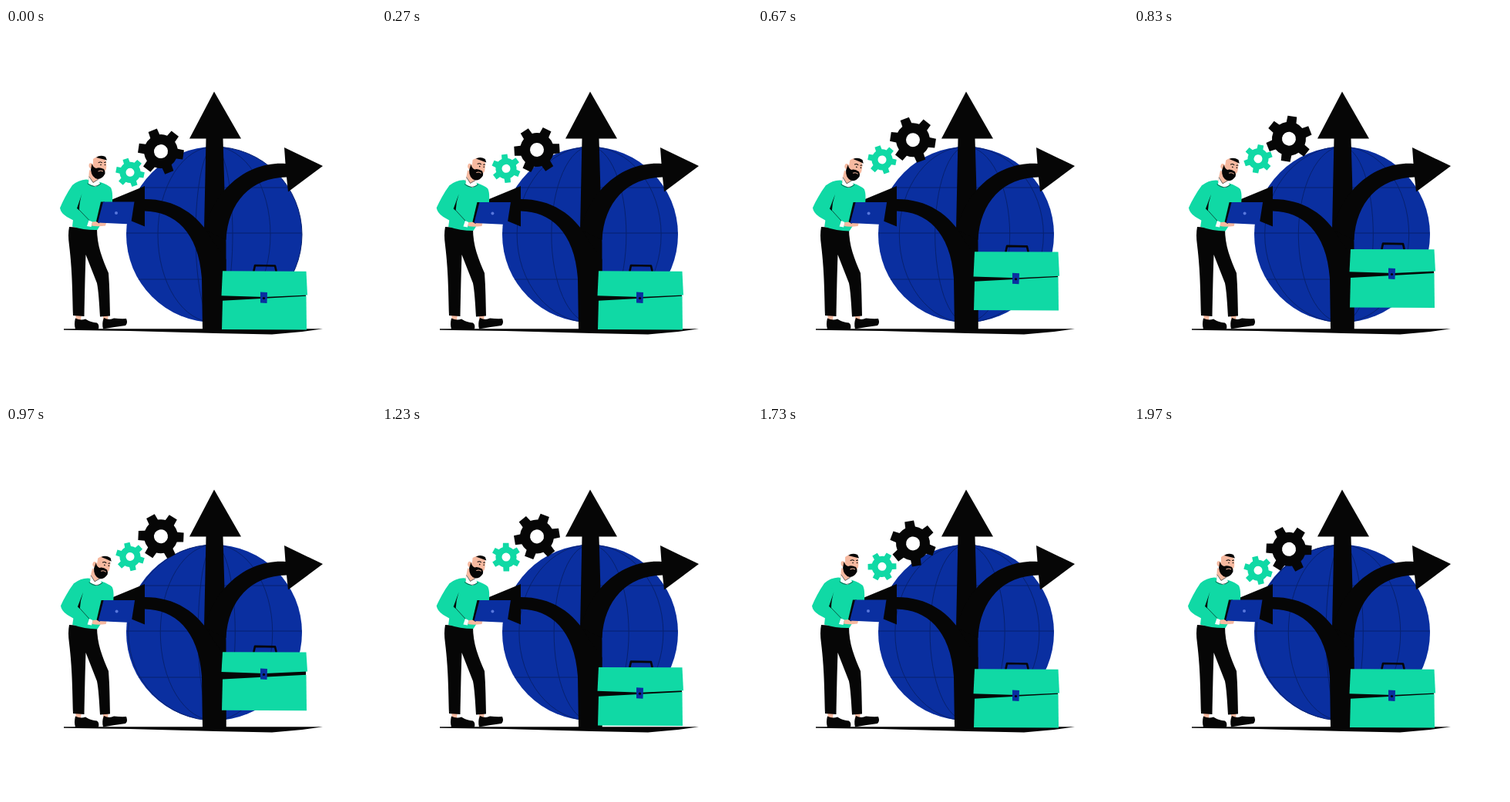
These frames come from a looping animation (480x480 px, 2000 ms). An HTML page:

```html
<!DOCTYPE html>
<html lang="en">
<head>
<meta charset="utf-8">
<title>Choosing a career path</title>
<style>
  html, body { margin: 0; width: 100%; height: 100%; overflow: hidden; background: #fff; }
  svg { display: block; width: 100vw; height: 100vh; }
  .ink { fill: #060606; }
  .blue { fill: #0a2fa0; }
  .green { fill: #10d9a5; }
  .skin { fill: #f6b9a0; }
  .white { fill: #fff; }
  .line { fill: none; stroke: #060606; stroke-linecap: round; stroke-linejoin: round; }
  #grid { fill: none; stroke: #07216f; stroke-width: 1; }
</style>
</head>
<body>
<svg viewBox="0 0 480 480">
  <g id="globe">
    <circle class="blue" cx="270" cy="268" r="114"/>
    <path id="grid"/>
  </g>

  <g id="arrows" class="ink">
    <path d="M270 82.500L305 143.500H281.500L285.500 280V391H255L257 262L259.500 143.500H238Z"/>
    <path d="M361 155L411 179L366 212.500L364 193.500C318 194 288 226 285.500 275L258 262C269 211 312 173 362.500 176Z"/>
    <path d="M180 205L134 224L130 237L180 257.500V237.500C218 238 250 264 254 325L255 391H285.500V300L270 279C250 240 218 222 180 222Z"/>
  </g>

  <path id="bigGear" class="ink" fill-rule="evenodd"/>
  <path id="smallGear" class="green" fill-rule="evenodd"/>

  <path class="ink" d="M75 390.300H411L384 394L345 397.600L272 396L160 393L75 391.700Z"/>

  <g id="bag">
    <path id="handle" class="line" stroke-width="2.600"/>
    <path id="gap" class="ink"/>
    <path id="base" class="green"/>
    <path id="lid" class="green"/>
    <g id="clasp">
      <path class="blue" d="M330 342.500L339 343L338.500 357L330 356.500Z"/>
      <circle class="ink" cx="334.500" cy="350.500" r="1.600"/>
    </g>
  </g>

  <g id="legs">
    <path class="skin" d="M90 371H98L97 379H91ZM126 371H133L132 379H126Z"/>
    <path class="ink" d="M82 258L118 260C118 283 125 299 133 318C134.500 337 134.500 356 135 373.500L122 374.500C121 357 120 341 118 331L103.500 294C102.500 321 102 350 101.500 374L87 373C86 338 86 316 82 282Q80 268 82 258Z"/>
    <path class="ink" d="M90 376.500Q97 380 103 377.500Q110 382 118 382.500Q122 386 119.500 391H90Q88 384 90 376.500Z"/>
    <path class="ink" d="M127 376Q134 379.500 140 376.500Q149 377.500 156 377Q158.500 383 155 386Q141 387.500 126 390.500Q124 383 127 376Z"/>
  </g>

  <g id="torso">
    <path class="green" d="M104 196.500C115 197 131 202 136 207C139 213 138 222 138 230L118.500 262Q102 262.500 86 257.500L88 240L86 204Q94 197 104 196.500Z"/>
    <g id="head">
      <path class="skin" d="M108 184L119 190L119 203Q112 204 107 198Z"/>
      <path class="skin" d="M113 170Q120 164 128 168Q131 174 130 183L125 192L113 190L111 183Q106 181 108 176Q110 174 113 177Z"/>
      <path class="ink" d="M117 168Q122 164 129 167L131 171.500Q124 169.500 117 168Z"/>
      <path class="ink" d="M111.500 176Q113 181 117 182Q121 180 127 183Q129 186 128.500 189Q125 196 119 196Q111 194 110 184Z"/>
      <path d="M119.500 186Q123 184 126 186" fill="none" stroke="#f6b9a0"/>
      <path class="line" stroke-width="1" d="M120 174.500Q122.500 173 124.500 174.500M127.500 174.500L129.500 174"/>
      <circle class="ink" cx="123" cy="177.500" r=".8"/>
      <circle class="ink" cx="128.500" cy="177.500" r=".8"/>
    </g>
    <path class="white" d="M108 192L113 200.500L119.500 196L122 202L116 206L107 202Z"/>
    <path class="line" stroke-width=".6" d="M108 193L113 200.500L119.500 196.500M106 202Q115 209 123 202"/>
    <path class="green" d="M86 204C79 214 74 224 70 233.500Q71 240 79 245Q91 252 104 257.500L108 250L93 236L99 212Z"/>
    <path class="ink" d="M98.500 215L92 234L95 236.500Q95 226 98.500 215Z"/>
    <path class="line" stroke-width=".6" d="M95 236L108 249.500"/>
  </g>

  <g id="hands">
    <path class="white" d="M107.500 249.500L112 251.500L110.500 258L105 257Z"/>
    <path class="skin" d="M112 251.500Q121 250 130 253L129 256.500Q118 258 111 256.500Z"/>
    <path class="ink" d="M123 225.500H128L121 253.500L117 251Z"/>
    <path class="blue" d="M126 225.500H166.500L162 254.500L119 252.500Z"/>
    <circle cx="143" cy="240" r="2" fill="#5877dc"/>
  </g>
</svg>

<script>
const LOOP = 2000, FRAMES = 60;
const el = id => document.getElementById(id);
const rad = deg => deg * Math.PI / 180;

// Standard ease curve, cubic-bezier(.4, 0, .2, 1).
function ease(x) {
  let lo = 0, hi = 1;
  for (let i = 0; i < 24; i++) {
    const s = (lo + hi) / 2, r = 1 - s;
    if (1.2 * s * r * r + 0.6 * s * s * r + s ** 3 < x) lo = s; else hi = s;
  }
  return lo * lo * (3 - 2 * lo);
}

// Rises for half a loop, then runs the same curve backwards.
function swing(t) {
  const p = ((t + LOOP) % LOOP) / (LOOP / 2);
  return ease(p < 1 ? p : 2 - p);
}

// Smooth path through [time, value] keys, flat at the turning points.
function follow(keys, t) {
  const last = keys.length - 1;
  if (t <= keys[0][0]) return keys[0][1];
  if (t >= keys[last][0]) return keys[last][1];
  const i = keys.findIndex(k => k[0] > t) - 1;
  const slope = j => (keys[j + 1][1] - keys[j][1]) / (keys[j + 1][0] - keys[j][0]);
  const tangent = j => {
    if (j === 0 || j === last) return 0;
    const a = slope(j - 1), b = slope(j);
    return a * b <= 0 ? 0 : 2 * a * b / (a + b);
  };
  const [t0, v0] = keys[i], [t1, v1] = keys[i + 1];
  const d = t1 - t0, u = (t - t0) / d, w = 1 - u;
  return v0 * w * w * (1 + 2 * u) + v1 * u * u * (3 - 2 * u)
    + d * u * w * (tangent(i) * w - tangent(i + 1) * u);
}

const SWAY = [[0, 0], [270, 0.75], [560, 1], [970, 1], [1230, 0.75], [1500, 0.05], [2000, 0]];
const BAG = [[545, 0], [670, -25.3], [790, -29], [970, -22], [1230, -2.5], [1340, 0]];
const FLAP = [[545, 0], [670, -25], [840, -31], [970, -28], [1230, -3.5], [1340, 0]];

function gearPath(outer, root, hole) {
  const at = (r, deg) => `${(r * Math.sin(rad(deg))).toFixed(2)} ${(-r * Math.cos(rad(deg))).toFixed(2)}`;
  let d = '';
  for (let a = 0; a < 360; a += 60) {
    d += `${a ? 'L' : 'M'}${at(root, a - 17)}L${at(outer, a - 11.5)}L${at(outer, a + 11.5)}L${at(root, a + 17)}`
      + `A${root} ${root} 0 0 1 ${at(root, a + 43)}`;
  }
  return d + `ZM${hole} 0A${hole} ${hole} 0 1 0 ${-hole} 0A${hole} ${hole} 0 1 0 ${hole} 0Z`;
}
el('bigGear').setAttribute('d', gearPath(30, 22, 9));
el('smallGear').setAttribute('d', gearPath(18.8, 13.6, 5.5));

// Each meridian slides from its stop to the next one on the left.
const STOPS = [-114, -73, -24, 24, 73, 114];

function drawGrid(t) {
  let d = '';
  for (const y of [207, 266, 326]) {
    const half = Math.sqrt(114 ** 2 - (y - 268) ** 2);
    d += `M${270 - half} ${y}H${270 + half}`;
  }
  const p = (t % 500) / 500;
  for (let i = 1; i < STOPS.length; i++) {
    const x = STOPS[i] + (STOPS[i - 1] - STOPS[i]) * p;
    d += `M270 154A${Math.abs(x)} 114 0 0 ${x > 0 ? 1 : 0} 270 382`;
  }
  el('grid').setAttribute('d', d);
}

function drawBag(t) {
  const a = follow(BAG, t), b = follow(FLAP, t), m = (a + b) / 2;
  const poly = (id, pts) => el(id).setAttribute('d', 'M' + pts.map(p => p.join(' ')).join('L') + 'Z');
  poly('gap', [[281, 340 + b], [389, 340 + b], [389, 352 + m], [281, 358 + m]]);
  poly('base', [[281, 353.7 + m], [389.5, 347.8 + m], [390, 391.5 + a], [280, 391 + a]]);
  poly('lid', [[281, 315.3 + a], [389.5, 315.7 + a], [391, 346.6 + b], [336, 349 + b], [279.5, 347.2 + b]]);
  el('handle').setAttribute('d', `M321.5 ${315 + a}L323 ${308 + a}L349 ${308.5 + a}L350.5 ${315 + a}`);
  el('clasp').setAttribute('transform', `translate(0 ${b})`);
}

function draw(t) {
  const set = (id, v) => el(id).setAttribute('transform', v);
  const turn = t * 0.18, sway = follow(SWAY, t);
  set('bigGear', `translate(201 ${160.3 - 17.2 * swing(t - 67)}) rotate(${38.5 + turn})`);
  set('smallGear', `translate(161 ${187.3 - 17.8 * swing(t)}) rotate(${41 - turn})`);
  set('torso', `translate(0 ${0.8 * sway}) rotate(${1.9 * sway} 100 262)`);
  set('head', `rotate(${7 * sway} 114 196)`);
  set('hands', `translate(${0.6 * sway} ${0.6 * sway})`);
  drawGrid(t);
  drawBag(t);
}

const start = performance.now();
function tick() {
  const t = (performance.now() - start) % LOOP;
  const step = Math.min(FRAMES - 1, Math.floor((t + 3.5) * FRAMES / LOOP));
  draw(step * LOOP / FRAMES);
  requestAnimationFrame(tick);
}
tick();
</script>
</body>
</html>
```
